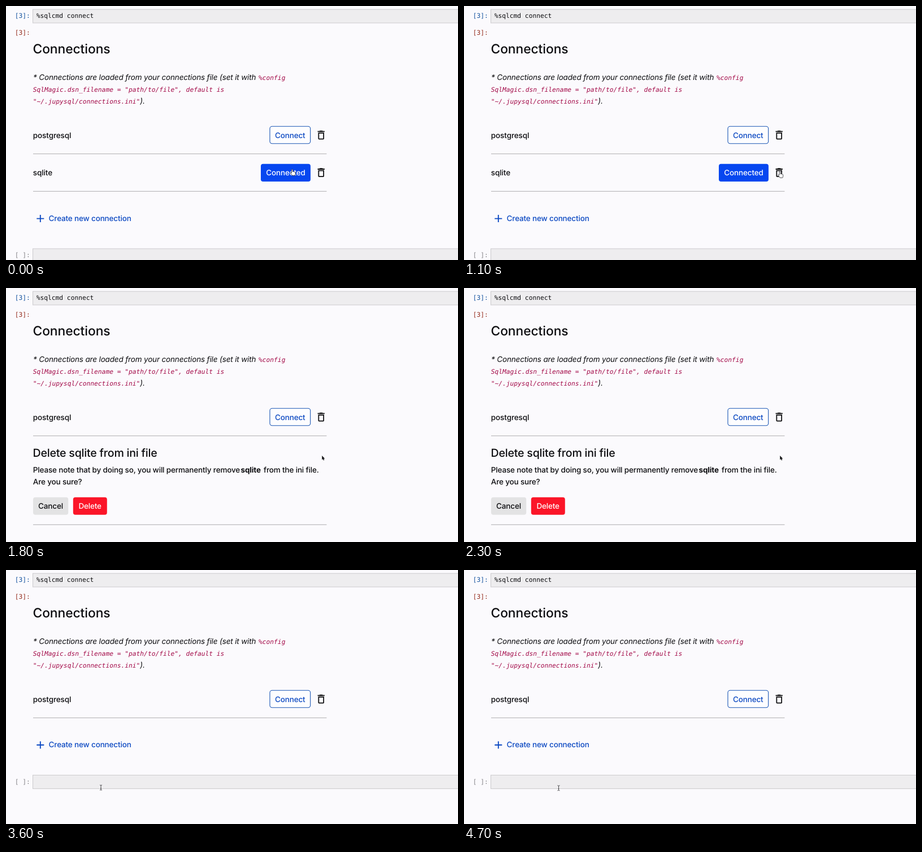
These frames come from a looping animation (800 by 450 pixels, 4800 ms). An HTML page:

```html
<!DOCTYPE html>
<html lang="en">
<head>
<meta charset="utf-8">
<title>Connections</title>
<style>
  html, body { margin: 0; width: 100%; height: 100%; overflow: hidden; background: #fbfafd; }
  svg { display: block; width: 800px; height: 450px; }
  text {
    font: 450 13.5px Inter, sans-serif; letter-spacing: -.16px; fill: #0c0c0f;
    font-optical-sizing: none; text-rendering: geometricPrecision; white-space: pre;
  }
  .title { font-size: 22.8px; font-weight: 500; letter-spacing: -.06px; }
  .heading { font-size: 19.6px; font-weight: 500; letter-spacing: -.22px; }
  .name { font-weight: 550; letter-spacing: -.1px; }
  .bold { font-weight: 700; }
  .italic { font-style: italic; }
  .mono { font: 11.25px "DejaVu Sans Mono", monospace; letter-spacing: 0; }
  .code { font-style: italic; fill: #a30a48; }
  .mid { text-anchor: middle; }
  .blue { fill: #0c49c2; }
  .white { fill: #fff; }
  .rule { stroke: #bcbbbe; stroke-width: 1.3; }
  .cell { fill: #eeedef; stroke: #cbcacd; }
</style>
</head>
<body>
<svg viewBox="0 0 800 450">
  <defs>
    <path id="trash" transform="translate(547.2 218) scale(.88)" fill="#0c0c0e"
      d="M6 19c0 1.1.9 2 2 2h8c1.1 0 2-.9 2-2V7H6v12zM8 9h8v10H8V9zm7.5-5l-1-1h-5l-1 1H5v2h14V4z"/>
  </defs>
  <rect width="800" height="450" fill="#fbfafd"/>

  <rect class="cell" x="47.5" y="6" width="760" height="24"/>
  <text class="mono" x="15.7" y="21.3" style="fill:#0f4f9c">[3]:</text>
  <text class="mono" x="53.7" y="21.3">%sqlcmd connect</text>
  <text class="mono" x="15.7" y="51" style="fill:#922718">[3]:</text>

  <text class="title" x="47.5" y="84">Connections</text>
  <text class="italic" x="48" y="131.3">* Connections are loaded from your connections file (set it with</text>
  <text class="mono code" x="447" y="131.3">%config</text>
  <text class="mono code" x="47.7" y="152.2">SqlMagic.dsn_filename = "path/to/file", default is</text>
  <text class="mono code" x="47.7" y="173">"~/.jupysql/connections.ini"</text>
  <text class="italic" x="237.3" y="173">).</text>

  <text class="name" x="47.8" y="233.6">postgresql</text>
  <rect x="467" y="213.3" width="71.7" height="30.4" rx="4" fill="#fdfdff" stroke="#1b56b4" stroke-width="1.1"/>
  <text class="mid blue" x="502.8" y="233.8">Connect</text>
  <use href="#trash"/>
  <path class="rule" d="M48 261.8H567.5"/>

  <g id="sqliteRow">
    <text class="name" x="47.8" y="300.3">sqlite</text>
    <rect x="451" y="279.7" width="88" height="31.2" rx="4" fill="#0647f0"/>
    <text class="mid white" x="495" y="300.4">Connected</text>
    <use href="#trash" y="66.6"/>
    <path class="rule" d="M48 328.4H567.5"/>
  </g>

  <g id="confirm">
    <text class="heading" x="47.6" y="299.3">Delete sqlite from ini file</text>
    <text x="47.8" y="327.2">Please note that by doing so, you will permanently remove</text>
    <text class="bold" x="415.5" y="327.2">sqlite</text>
    <text x="456" y="327.2">from the ini file.</text>
    <text x="47.8" y="348">Are you sure?</text>
    <rect x="48" y="370.8" width="62.2" height="31" rx="4" fill="#e3e3e4"/>
    <text class="mid" x="79" y="391.4">Cancel</text>
    <rect x="118.8" y="370.8" width="60" height="31" rx="4" fill="#fb1528"/>
    <text class="mid white" x="148.6" y="391.4">Delete</text>
    <path class="rule" d="M48 419.3H567.5"/>
  </g>

  <g id="footer">
    <path d="M54.3 376.6H67.3M60.8 370.1V383.1" stroke="#0c49c2" stroke-width="1.9"/>
    <text class="blue" x="75.6" y="381">Create new connection</text>
    <rect class="cell" x="47.5" y="430" width="760" height="24"/>
    <text class="mono" x="15.7" y="445.4" style="fill:#838286">[ ]:</text>
  </g>

  <g id="hand" fill="#fff" stroke="#26262b" stroke-width=".8" stroke-linejoin="round">
    <path d="M-1 5V.9a1 1 0 0 1 2 0V4q.9-.5 1.6.2q1-.4 1.6.4q1.3-.2 1.5 1V8q0 1.5-1 2.8H.2Q-.8 9-3 6.8q-.4-1.3.6-1.3L-1 6.4z"/>
  </g>
  <g id="arrow">
    <path d="M0 0V7.3L1.6 5.9L2.7 8.4L4 7.8L2.9 5.4H5.1z" fill="#111114" stroke="#fff" stroke-width=".8" paint-order="stroke"/>
  </g>
  <g id="beam" fill="none" stroke="#3a3a3e" stroke-width=".9">
    <path d="M-2-4.5Q0-4.5 0-3.5Q0-4.5 2-4.5M0-3.5V3.5M-2 4.5Q0 4.5 0 3.5Q0 4.5 2 4.5M-1 1.5H1"/>
  </g>
</svg>
<script>
const LOOP = 4800, STEP = 100;
const OPENED = 1800, DELETED = 3600;
const ROW_HEIGHT = 66.6;

// Pointer hot spot: time, x, y
const path = [
  [0, 506.5, 289.5], [400, 507, 289.5], [600, 516, 290], [800, 552, 294],
  [900, 568, 295], [1100, 559, 293.5], [1500, 559, 293.5], [1700, 559.5, 295.5],
  [1800, 559.3, 297], [2300, 559.3, 297], [2500, 510, 318], [2800, 330, 364],
  [3100, 235.3, 372], [3300, 169, 381], [3500, 168, 382],
  [3600, 168, 385.5], [4200, 168, 385.5], [4300, 167.5, 386.3], [4800, 167.5, 386.3]
];

const part = id => document.getElementById(id);
const show = (id, on) => part(id).setAttribute('visibility', on ? 'visible' : 'hidden');
const inside = (x, y, left, top, right, bottom) => x > left && x < right && y > top && y < bottom;

function pointerAt(t) {
  const i = path.findIndex(key => key[0] > t);
  const [t0, x0, y0] = path[i - 1], [t1, x1, y1] = path[i];
  const k = (t - t0) / (t1 - t0);
  return [x0 + (x1 - x0) * k, y0 + (y1 - y0) * k];
}

function cursorKind(t, x, y) {
  if (t >= DELETED) return 'beam';
  const overButton = t < OPENED
    ? inside(x, y, 451, 280, 539, 311) || inside(x, y, 551, 286, 565, 305)
    : inside(x, y, 119, 371, 179, 402);
  return overButton ? 'hand' : 'arrow';
}

function draw(now) {
  const t = Math.floor(now % LOOP / STEP) * STEP;
  const asking = t >= OPENED && t < DELETED;
  show('sqliteRow', t < OPENED);
  show('confirm', asking);
  show('footer', !asking);
  part('footer').setAttribute('transform', `translate(0 ${t < DELETED ? 0 : -ROW_HEIGHT})`);

  const [x, y] = pointerAt(t);
  const kind = cursorKind(t, x, y);
  for (const id of ['hand', 'arrow', 'beam']) show(id, id === kind);
  part(kind).setAttribute('transform', `translate(${x} ${y})`);
}

const start = performance.now();
function tick() {
  draw(performance.now() - start);
  requestAnimationFrame(tick);
}
tick();
</script>
</body>
</html>
```
